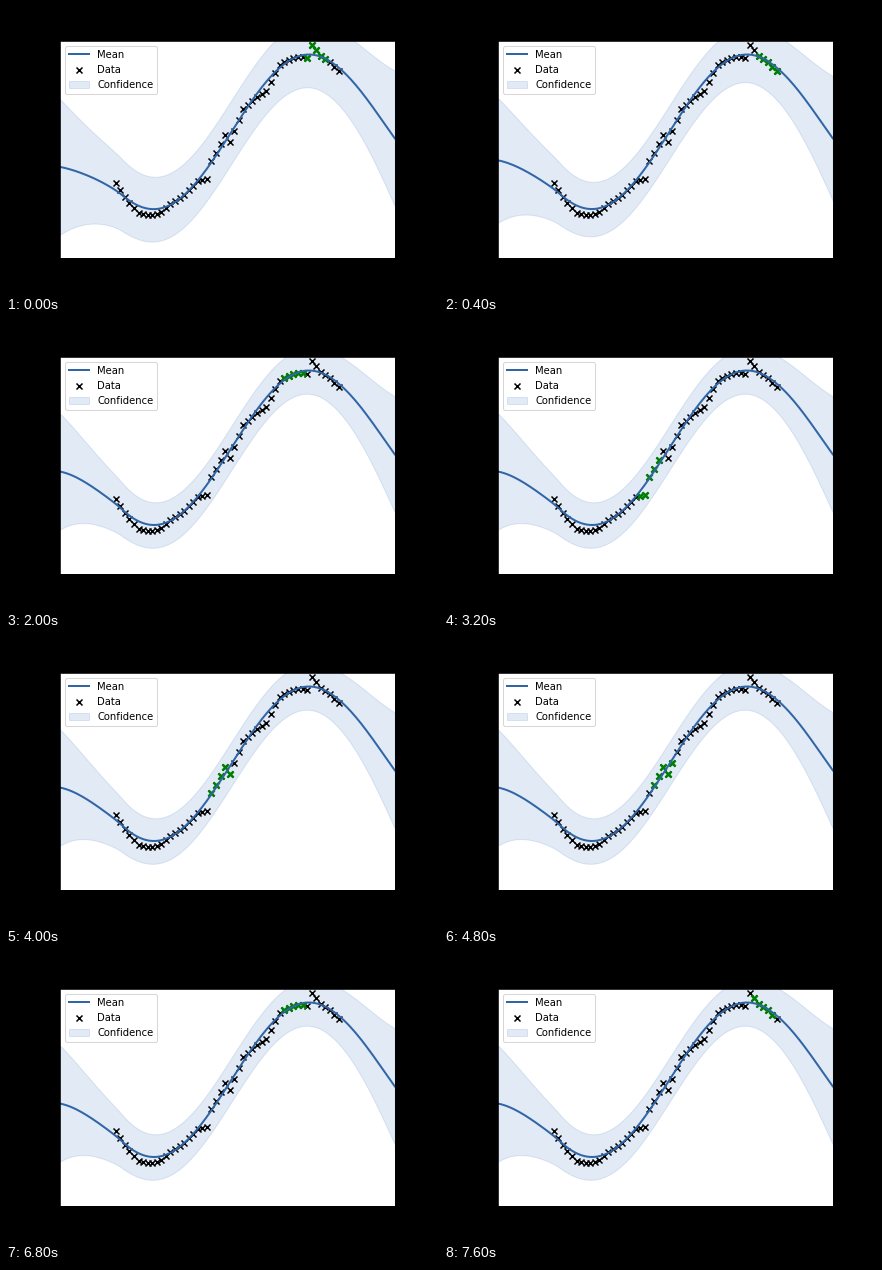
A matplotlib script for the animation above (8000 ms loop, 432 px wide and 288 px high).

```python
import numpy as np
import matplotlib.pyplot as plt
from matplotlib.animation import FuncAnimation

W, H, DPI = 432, 288, 72
# Data coordinates are stage pixels, y pointing down
LEFT, RIGHT, TOP, BOTTOM = 54, 388.8, 34.56, 252
LINE, FILL = "#3065a6", "#3a73be"
N_POINTS, BATCH = 50, 5

# First point of the random mini-batch at each training step
starts = [42, 45, 14, 1, 5, 37, 7, 17, 19, 34,
          21, 4, 22, 22, 10, 0, 36, 37, 21, 44]

grid = np.linspace(LEFT, RIGHT, 200)


def wave(x):
    return 125.75 + 77.25 * np.cos(np.pi * (x - 148) / 155)


def observations():
    """Evenly spaced points scattered about the wave."""
    pad = (RIGHT - LEFT) / 6
    x = np.linspace(LEFT + pad, RIGHT - pad, N_POINTS)
    index = [0, 2, 5, 10, 12, 18, 20, 21, 24, 25, 28, 33, 36, 42, 43, 45, 49]
    noise = [-4, 1, 8, 4, -1, 0, 10, -1, -7, 7, -4, 9, -3, 3, -10, -1, 3]
    return x, wave(x) + np.interp(np.arange(N_POINTS), index, noise)


def posterior(step):
    """Mean and half-width of the band; the fit settles within five steps."""
    rest = 0.43 ** min(step, 5)
    # Away from the data the mean falls back towards the prior
    left = np.clip((115 - grid) / (115 - LEFT), 0, 1)
    right = np.clip((grid - 320) / (RIGHT - 320), 0, 1)
    mean = wave(grid) + 49 * left ** 1.6 - 6.3 * right ** 1.6
    mean += rest * 11.5 * np.exp(-((grid - LEFT) / 45) ** 2)
    u = np.abs(2 * (grid - LEFT) / (RIGHT - LEFT) - 1)
    half = np.sqrt(480 + 530 * rest + (2880 + 720 * rest) * u ** 5.5)
    return mean, half


def outline(mean, half):
    x = np.concatenate([grid, grid[::-1]])
    y = np.concatenate([mean - half, (mean + half)[::-1]])
    return np.column_stack([x, y])


fig = plt.figure(figsize=(W / DPI, H / DPI), dpi=DPI, facecolor="black")
ax = fig.add_axes([0.125, 0.125, 0.775, 0.755])
ax.set(xlim=(LEFT, RIGHT), ylim=(BOTTOM, TOP), xticks=[], yticks=[])

points = np.column_stack(observations())
mean, half = posterior(0)
line, = ax.plot(grid, mean, color=LINE, lw=2, label="Mean")
ax.scatter(*points.T, marker="x", color="black", label="Data")
band = ax.fill_between(grid, mean - half, mean + half, color=FILL,
                       alpha=0.15, zorder=0.5, label="Confidence")
batch = ax.scatter([], [], marker="x", color="green", linewidth=2.5)
ax.legend(loc="upper left")


def update(step):
    mean, half = posterior(step)
    line.set_ydata(mean)
    band.set_verts([outline(mean, half)])
    first = starts[step]
    batch.set_offsets(points[first:first + BATCH])
    return line, band, batch


anim = FuncAnimation(fig, update, frames=len(starts), interval=400,
                     repeat=True, repeat_delay=0, blit=False)
plt.show()
```
